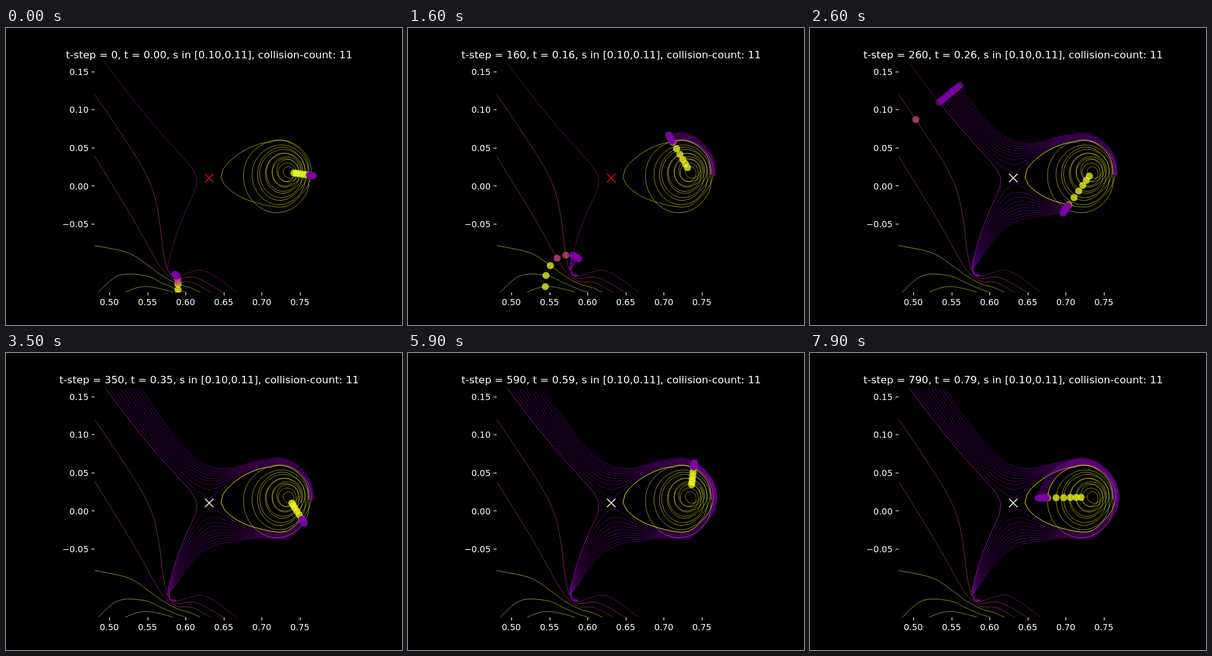
Animation, 640 px wide and 480 px high, one loop 8 s. Source, as an HTML page with a canvas:

```html
<!DOCTYPE html>
<html>
<head>
<meta charset="utf-8">
<style>
html, body { margin: 0; width: 100%; height: 100%; overflow: hidden; background: #000; }
svg, canvas { position: absolute; left: 0; top: 0; }
text { font: 13.89px "DejaVu Sans", sans-serif; fill: #fff; }
#title { font-size: 16.67px; }
</style>
</head>
<body>
<svg id="axes" width="640" height="480"><text id="title" x="328.3" y="49.3" text-anchor="middle"></text></svg>
<canvas id="plot" width="640" height="480"></canvas>
<script>
const YELLOW = '#f0f921', RED = '#cc4778', MAGENTA = '#9c179e', PURPLE = '#7e03a8';
const LEFT = 143.2, TOP = 57.6, SIZE = 369.6;
const MEET = .21, NEAR = .16, FAR = .3; // collision time and the span it affects
const axes = document.getElementById('axes'), title = document.getElementById('title');
const ctx = document.getElementById('plot').getContext('2d');

// Smooth interpolation of vectors given at the times
function spline(times, values, t) {
  const last = values.length - 1;
  let i = 0;
  while (i < last - 1 && t > times[i + 1]) i++;
  const h = times[i + 1] - times[i], u = (t - times[i]) / h, v = 1 - u;
  const slope = (j, c) => {
    const a = Math.max(j - 1, 0), b = Math.min(j + 1, last);
    return (values[b][c] - values[a][c]) / (times[b] - times[a]);
  };
  return values[0].map((_, c) =>
    v * v * (1 + 2 * u) * values[i][c] + u * u * (3 - 2 * u) * values[i + 1][c] +
    h * u * v * (v * slope(i, c) - u * slope(i + 1, c)));
}

// The right root winds twice around a centre: time, degrees, radius for s = 0 and s = 5
const turn = [
  [0, -8, 9.5, 34], [.08, 57, 9, 40], [.16, 120, 8.6, 56], [.26, 234.5, 7.8, 65],
  [.35, 302, 11.3, 41], [.49, 396, 18.6, 39.4], [.68, 483, 20.6, 58.5],
  [.79, 541, 18, 72], [.88, 604, 16, 71], [.95, 665, 12, 47]
];
const turns = [-1, 0, 1].flatMap(n => turn.map(([t, a, ...r]) => [t + n, a + 720 * n, ...r]));
const turnTimes = turns.map(k => k[0]), turnValues = turns.map(k => k.slice(1));
function rightRoot(s, t) {
  const [deg, inner, outer] = spline(turnTimes, turnValues, t);
  const u = s / 5, a = deg * Math.PI / 180;
  const r = inner + (outer - inner) * u * (.66 + .34 * u);
  return [456 + r * Math.cos(a), 233 - r * Math.sin(a)];
}

// The left root for s = 0 to 6
const leftTimes = [-.12, -.04, 0, .08, NEAR, MEET, .26, FAR];
const leftKeys = [
  [[290, 438], [284, 433], [278, 430], [252, 422], [222, 418], [195, 426], [165, 445]],
  [[310, 440], [290, 427], [278, 423], [252, 412], [223, 400], [180, 401], [140, 436]],
  [[314, 427], [296, 419], [278, 414], [252, 400], [230, 384], [196, 363], [135, 350]],
  [[331, 427], [300, 411], [278, 410], [258, 396], [241, 372], [199, 298], [130, 186]],
  [[351, 427], [305, 403], [277, 405], [264, 396], [255, 367], [235, 256], [171, 148], [110, 62]],
  [[373, 427], [318, 392], [276, 401], [265, 395], [266, 367], [308, 247], [209, 120], [138, 26]],
  [[378, 427], [320, 388], [273, 398], [264, 393], [276, 373], [335, 308], [242, 93], [195, 15]]
];
function leftLine(s) {
  const a = leftKeys[Math.floor(s)], b = leftKeys[Math.ceil(s)], f = s % 1;
  return a.map((p, i) => p.map((v, c) => v + (b[i][c] - v) * f));
}

// Near the collision both roots are middle ± sqrt(d), with middle and d smooth
function pairKeys(s) {
  const line = leftLine(s), f = s - 5;
  return leftTimes.map((t, i) => {
    if (t === MEET) return [328 + 8 * f, 242 + 6 * f, 380 - 4380 * f, 0];
    const [lx, ly] = line[i], [rx, ry] = rightRoot(s, t);
    const x = (rx - lx) / 2, y = (ry - ly) / 2;
    return [(lx + rx) / 2, (ly + ry) / 2, x * x - y * y, 2 * x * y];
  });
}
function pairRoot(keys, swaps, side, t) {
  const [mx, my, re, im] = spline(leftTimes, keys, t);
  const size = Math.hypot(re, im);
  const x = Math.sqrt(Math.max(0, size + re) / 2), y = Math.sqrt(Math.max(0, size - re) / 2) * (im < 0 ? -1 : 1);
  const sign = swaps && y > 0 ? -side : side;
  return [mx + sign * x, my + sign * y];
}

// A root's whole path; side is 1 for a start on the right, -1 on the left
function path(s, side) {
  const swaps = s > 5, line = leftLine(s), keys = s >= 5 && pairKeys(s);
  const at = t => {
    if (keys && t > NEAR && t < FAR) return pairRoot(keys, swaps, side, t);
    const onRight = swaps && t >= FAR ? side < 0 : side > 0;
    return onRight ? rightRoot(s, t) : spline(leftTimes, line, t);
  };
  const endsRight = swaps ? side < 0 : side > 0;
  return { at, start: side > 0 ? 0 : leftTimes[0], end: endsRight ? 1 : leftTimes[line.length - 1] };
}

const curves = [];
function add(s, side, color) {
  const p = path(s, side), points = [];
  for (let t = p.start; t <= p.end + 1e-6; t += .002) points.push([t, ...p.at(t)]);
  curves.push({ ...p, points, color, fixed: s <= 5, trail: s >= 5 });
}
for (let s = 0; s < 5; s++) add(s, -1, s < 3 ? YELLOW : RED);
for (let s = 0; s <= 5; s++) add(s, 1, YELLOW);
add(5, -1, MAGENTA);
for (let k = 1; k <= 10; k++) for (const side of [1, -1]) add(5 + k / 10, side, PURPLE);

function stroke(c, from, to) {
  ctx.beginPath();
  for (const [t, x, y] of c.points) if (t >= from - 1e-6 && t <= to) ctx.lineTo(x, y);
  if (to < c.end) ctx.lineTo(...c.at(to));
  ctx.strokeStyle = c.color;
  ctx.stroke();
}

function draw(step) {
  const t = step / 1000;
  title.textContent = `t-step = ${step}, t = ${t.toFixed(2)}, s in [0.10,0.11], collision-count: 11`;
  ctx.clearRect(0, 0, 640, 480);
  ctx.save();
  ctx.beginPath();
  ctx.rect(LEFT, TOP, SIZE, SIZE);
  ctx.clip();
  ctx.globalAlpha = .85;
  ctx.lineWidth = .7;
  for (const c of curves) {
    if (c.fixed) stroke(c, c.start, c.end);
    if (c.trail && t > 0) stroke(c, 0, t);
  }
  ctx.globalAlpha = .75;
  for (const c of curves) {
    if (t > c.end) continue;
    ctx.fillStyle = c.color === MAGENTA ? PURPLE : c.color;
    ctx.beginPath();
    ctx.arc(...c.at(t), 5.8, 0, 7);
    ctx.fill();
  }
  ctx.globalAlpha = 1;
  ctx.strokeStyle = t < MEET ? '#cc0c0c' : '#d9d9d4';
  ctx.lineWidth = 1.8;
  ctx.beginPath();
  for (const d of [-6.8, 6.8]) {
    ctx.moveTo(321.7, 242.4 - d);
    ctx.lineTo(335.3, 242.4 + d);
  }
  ctx.stroke();
  ctx.restore();
}

function element(tag, attrs, text = '') {
  const e = document.createElementNS('http://www.w3.org/2000/svg', tag);
  for (const a in attrs) e.setAttribute(a, attrs[a]);
  e.textContent = text;
  axes.append(e);
}
for (let i = 0; i < 6; i++) {
  const x = 167 + 61.6 * i, y = 70.5 + 61.6 * i, value = .15 - .05 * i;
  element('rect', { x: Math.round(x) - .05, y: 427.2, width: 1.1, height: 4.9, fill: '#fff' });
  element('text', { x, y: 447.7, 'text-anchor': 'middle' }, (.5 + .05 * i).toFixed(2));
  if (i === 5) break;
  element('rect', { x: 138.3, y: Math.round(y) - .55, width: 4.9, height: 1.1, fill: '#fff' });
  element('text', { x: 133.5, y: y + 5.2, 'text-anchor': 'end' },
    (value < -.01 ? '\u2212' : '') + Math.abs(value).toFixed(2));
}

const begin = performance.now();
let shown = -1;
function tick() {
  const step = Math.floor((performance.now() - begin) / 100) % 80 * 10;
  if (step !== shown) draw(shown = step);
  requestAnimationFrame(tick);
}
tick();
</script>
</body>
</html>
```
